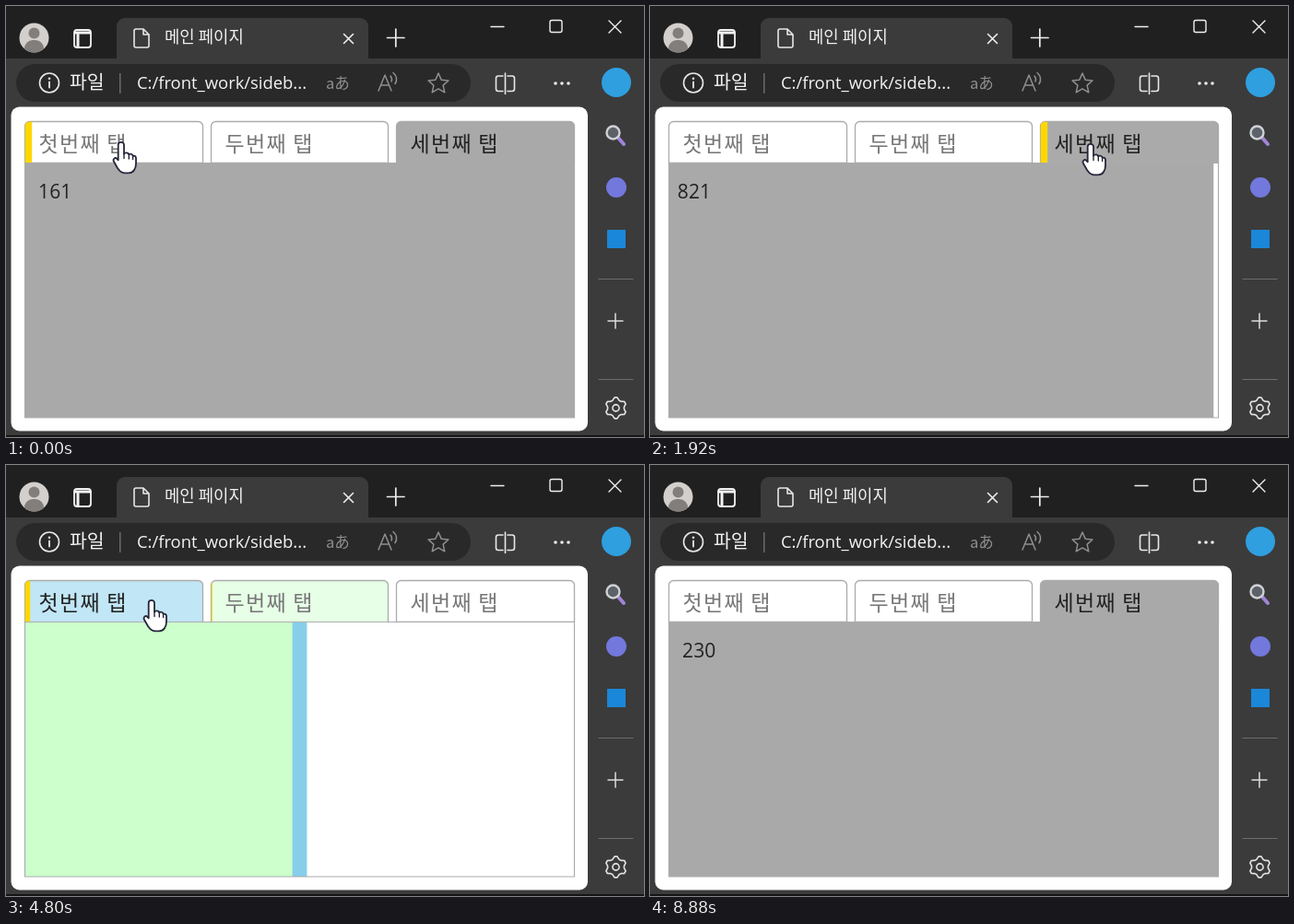
Animation of 692x468 px, one loop 8.96 s. Source, as an HTML page with a canvas:

```html
<!DOCTYPE html>
<html lang="ko">
<head>
<meta charset="utf-8">
<title>메인 페이지</title>
<style>
html, body { margin: 0; width: 100%; height: 100%; overflow: hidden; background: #3b3b3b; }
canvas { display: block; width: 692px; height: 468px; }
</style>
</head>
<body>
<canvas id="stage" width="692" height="468"></canvas>
<script>
const ctx = document.getElementById('stage').getContext('2d');
const LOOP = 8960, STEP = 80, DUR = 300;
const KR = '"Noto Sans CJK KR", "Noto Sans CJK", sans-serif';
const LATIN = '"Open Sans", "Noto Sans", ' + KR;
const LINE = '#ababab';

const tabs = [
  { x: 20, w: 194, label: '첫번째 탭', rgb: [135, 206, 235] },
  { x: 222, w: 193, label: '두번째 탭', rgb: [204, 255, 204] },
  { x: 423, w: 194, label: '세번째 탭', rgb: [169, 169, 169] }
];

// [time, tab]
const clicks = [[279, 1], [1657, 2], [3200, 0], [3980, 1], [4710, 0],
  [5250, 1], [5600, 0], [6320, 0], [8066, 2]];

// [time, x, y] of the pointer tip
const path = [
  [0, 125, 149], [90, 135, 150], [250, 262, 152], [1100, 290, 152],
  [1200, 350, 151], [1285, 423, 150], [1360, 470, 150], [1500, 478, 151],
  [2640, 478, 151], [2900, 455, 150], [2988, 415, 149], [3040, 327, 149],
  [3150, 140, 149], [3620, 140, 149], [3900, 262, 150], [4400, 262, 150],
  [4600, 232, 149], [4668, 214, 148], [4800, 158, 148], [5130, 158, 148],
  [5240, 262, 149], [5430, 255, 149], [5560, 160, 148], [5900, 148, 146],
  [7360, 148, 147], [7700, 440, 152], [8000, 582, 155], [8330, 586, 155],
  [8450, 592, 172], [8700, 612, 380], [8790, 700, 520]
];

const START = 1718025559164;

function ease(x) {
  if (x <= 0) return 0;
  if (x >= 1) return 1;
  let lo = 0, hi = 1, s;
  for (let i = 0; i < 24; i++) {
    s = (lo + hi) / 2;
    if (0.75 * s * (1 - s) + s ** 3 < x) lo = s; else hi = s;
  }
  return 0.3 * s * (1 - s) ** 2 + 3 * (1 - s) * s * s + s ** 3;
}

function pointer(t) {
  let i = 1;
  while (i < path.length - 1 && path[i][0] < t) i++;
  const a = path[i - 1], b = path[i];
  const k = Math.min(1, Math.max(0, (t - a[0]) / (b[0] - a[0])));
  return { x: a[1] + (b[1] - a[1]) * k, y: a[2] + (b[2] - a[2]) * k };
}

const hovered = p => tabs.findIndex(b =>
  p.x >= b.x && p.x <= b.x + b.w && p.y >= 125 && p.y <= 170);

// Value of a reversible on/off transition; events are [time, 0|1]
function level(events, t) {
  let from = events[0][1], to = from, t0 = -DUR;
  const at = u => from === to ? to
    : from + (to - from) * ease((u - t0) / (DUR * Math.abs(to - from)));
  for (const [time, on] of events) {
    if (time > t) break;
    if (on === to) continue;
    from = at(time);
    to = on;
    t0 = time;
  }
  return at(t);
}

tabs.forEach((tab, i) => {
  tab.active = [[-1, +(i === 2)], ...clicks.map(([t, n]) => [t, +(n === i)])];
  tab.hover = [[-1, +(i === 0)]];
  for (let t = 0; t < LOOP; t += 4) tab.hover.push([t, +(hovered(pointer(t)) === i)]);
});

function lastClick(t, tab) {
  let found;
  for (const c of clicks) if (c[0] <= t && (tab === undefined || c[1] === tab)) found = c;
  return found;
}

function text(str, x, y, font, color, spacing = 0, words = 0) {
  ctx.font = font;
  ctx.fillStyle = color;
  ctx.letterSpacing = spacing + 'px';
  ctx.wordSpacing = words + 'px';
  ctx.fillText(str, x, y);
}

function box(x, y, w, h, r, fill) {
  ctx.beginPath();
  ctx.roundRect(x, y, w, h, r);
  ctx.fillStyle = fill;
  ctx.fill();
}

function disc(x, y, r, fill) {
  ctx.beginPath();
  ctx.arc(x, y, r, 0, 7);
  ctx.fillStyle = fill;
  ctx.fill();
}

function stroke(d, color = '#e8e8e8', width = 1.5) {
  ctx.strokeStyle = color;
  ctx.lineWidth = width;
  ctx.lineJoin = ctx.lineCap = 'round';
  ctx.stroke(new Path2D(d));
}

const ring = (x, y, r) => `M${x - r} ${y}a${r} ${r} 0 1 0 ${2 * r} 0a${r} ${r} 0 1 0 ${-2 * r} 0`;

function polar(x, y, n, radius, turn) {
  let d = '';
  for (let i = 0; i < n; i++) {
    const a = turn + i * 2 * Math.PI / n, r = radius(i);
    d += (i ? 'L' : 'M') + (x + r * Math.cos(a)) + ' ' + (y + r * Math.sin(a));
  }
  return d + 'Z';
}

function drawTitleBar() {
  box(0, 0, 692, 58, 0, '#202020');
  box(0, 57, 692, 411, 0, '#3b3b3b');
  box(0, 466, 692, 2, 0, '#151515');
  box(120, 13, 273, 46, [9, 9, 0, 0], '#3b3b3b');

  ctx.save();
  disc(30.5, 34.5, 16, '#d2cfcc');
  ctx.clip();
  disc(30.5, 29.5, 6, '#827e7b');
  box(20, 37, 21, 20, 9, '#827e7b');
  ctx.restore();

  stroke('M77 26H89Q92 26 92 29V42Q92 45 89 45H77Q74 45 74 42V29Q74 26 77 26Z', '#f2f2f2', 1.8);
  stroke('M75 29H91M78 31V44', '#f2f2f2', 3);
  stroke('M141 25H149L155 31V43Q155 45 153 45H141Q139 45 139 43V27Q139 25 141 25ZM149 25V31H155', '#e8e8e8', 1.6);
  text('메인 페이지', 172, 40, `500 17.8px ${KR}`, '#f2f2f2');
  stroke('M366.5 30.5L376.5 40.5M376.5 30.5L366.5 40.5', '#eee', 1.6);
  stroke('M413.5 34.5H432M422.8 25V44', '#eee', 1.7);
  stroke('M526 22.5H540M592 15.5H601Q603 15.5 603 17.5V26.5Q603 28.5 601 28.5H592Q590 28.5 590 26.5V17.5Q590 15.5 592 15.5Z', '#f0f0f0', 1.4);
  stroke('M654 16L667 29M667 16L654 29', '#f0f0f0', 1.4);
}

function drawToolbar() {
  box(11, 63, 493, 41, 20.5, '#292929');
  stroke(ring(47, 83.5, 10.5), '#e8e8e8', 1.6);
  stroke('M47 82.5V88.5', '#e8e8e8', 1.8);
  disc(47, 78.7, 1.3, '#e8e8e8');
  text('파일', 69, 90, `500 20.5px ${KR}`, '#f2f2f2');
  box(123, 73, 1.5, 22, 0, '#6b6b6b');
  text('C:/front_work/sideb...', 142, 90, `18.4px ${LATIN}`, '#f4f4f4');
  text('aあ', 347, 90, `16.5px ${KR}`, '#8f8f8f');
  stroke('M404 92L411 75L418 92M406.5 86H415.5M417 76Q419.5 79 418 82M420 72.5Q426 78 422 84.5', '#8f8f8f', 1.5);
  stroke(polar(469, 84.5, 10, i => i % 2 ? 5.4 : 11.5, -Math.PI / 2), '#8f8f8f', 1.5);
  stroke('M539 76H534Q531.5 76 531.5 78.5V90Q531.5 92.5 534 92.5H539M544 76H549Q551.5 76 551.5 78.5V90Q551.5 92.5 549 92.5H544M541.5 73V95.5', '#e8e8e8', 1.6);
  for (const x of [596, 603, 610]) disc(x, 84, 1.8, '#eee');
}

function drawSidebar() {
  disc(662, 83, 16, '#2f9fe0');
  stroke('M664 143L670 150', '#a184d6', 4);
  disc(658.5, 137.5, 7, '#5d6268');
  stroke(ring(658.5, 137.5, 7), '#cfd2d6', 2.4);
  disc(662, 197, 11, '#7278dc');
  box(652, 243, 20, 20, 0, '#1b87d8');
  stroke('M643 296.5H680M643 405.5H680', '#6d6d6d', 1.2);
  stroke('M653 342H669M661 334V350', '#dedede', 1.5);
  const r = i => [9, 11.5, 11.5, 9][i % 4];
  stroke(polar(661.5, 436.5, 24, r, Math.PI / 24), '#e4e4e4', 1.6);
  stroke(ring(661.5, 436.5, 3.6), '#e4e4e4', 1.6);
}

function drawPanel(i, p, t) {
  if (p <= 0) return;
  const off = (p - 1) * 596, x = 35 + off;
  box(20 + off, 170, 596.5, 277, 0, `rgb(${tabs[i].rgb})`);
  const hit = lastClick(t, i), ink = '#222';
  const stamp = START + (hit ? hit[0] : 0);
  const font = `21px ${LATIN}`;
  if (i === 0) {
    const sec = Math.floor(stamp / 1000) % 60;
    text(`Mon Jun 10 2024 22:19:${sec} GMT+0900`, x, 208.5, font, ink, 0.14, 3.4);
    text('(한국 표준시)', x + 395, 208.5, `22.5px ${KR}`, ink, 1);
  } else {
    text(i === 1 ? String(stamp) : hit ? String(stamp % 1000) : '161', x, 208.5, font, ink, 0.14);
  }
}

function drawTab(tab, on, p, bar, selected) {
  const { x, w } = tab;
  const rgb = tab.rgb.map(c => Math.round(255 + (c - 255) * p));
  const shape = new Path2D();
  shape.roundRect(x + 0.5, 125.5, w - 1, 45.5, [5, 5, 0, 0]);
  ctx.save();
  ctx.beginPath();
  ctx.rect(x - 1, 124, w + 2, 47);
  ctx.clip();
  ctx.fillStyle = `rgb(${rgb})`;
  ctx.fill(shape);
  ctx.strokeStyle = LINE;
  ctx.lineWidth = 1.3;
  ctx.stroke(shape);
  ctx.globalAlpha = 1 - p;
  ctx.fillStyle = LINE;
  ctx.fillRect(x, 169.7, w, 1.3);
  ctx.globalAlpha = 1;
  ctx.clip(shape);
  ctx.fillStyle = '#ffd700';
  ctx.fillRect(x + 0.5, 125.5, bar * 7.7, 44.5);
  ctx.restore();

  const font = `23px ${KR}`;
  text(tab.label, x + 15.5, 157.5, font, on ? '#222' : '#777', 1.3);
  if (selected) {
    const head = ctx.measureText('첫번째 ').width;
    box(x + 15.5 + head - 1, 134, 23, 29, 0, '#2160cf');
    text('탭', x + 15.5 + head, 157.5, font, '#fff', 1.3);
  }
}

const hand = 'M-3.3 2C-3.3-2.2 3-2.2 3 2V11.5C4.2 9.8 7.8 10 8.3 12.3C9.6 11 12.3 11.6 12.6 13.8C14.5 13 16 14.2 16 16.5V22C16 28 13 32.3 8 32.3H3.5C0 32.3-2 30-4 27L-8 20C-9.6 17-6.5 15-4.6 16.8L-3.3 18.3Z';
const arrow = 'M0 0V22L5 17.5L9 26.5L13 24.5L9.2 16H16Z';

function drawPointer(p, isHand) {
  ctx.save();
  ctx.translate(p.x, p.y);
  const d = isHand ? hand : arrow;
  ctx.fillStyle = '#fff';
  ctx.fill(new Path2D(d));
  stroke(d, '#26263a', 1.8);
  if (isHand) stroke('M3 11.5V16.5M8.3 12.5V17M12.6 14V17.5', '#26263a', 1.4);
  ctx.restore();
}

function draw(t) {
  drawTitleBar();
  drawToolbar();
  drawSidebar();
  box(5.5, 109.5, 625.5, 352, 9, '#fff');

  const levels = tabs.map(tab => level(tab.active, t));
  const hit = lastClick(t);
  const current = hit ? hit[1] : 2;
  const selected = t >= 6160 && t < 6720;

  ctx.save();
  ctx.beginPath();
  ctx.rect(20, 170, 597, 277);
  ctx.clip();
  levels.forEach((p, i) => drawPanel(i, p, t));
  ctx.restore();
  ctx.strokeStyle = LINE;
  ctx.lineWidth = 1.2;
  ctx.strokeRect(20.5, 170.5, 596, 276.5);

  tabs.forEach((tab, i) =>
    drawTab(tab, i === current, levels[i], level(tab.hover, t), selected && i === 0));
  const p = pointer(t);
  drawPointer(p, hovered(p) >= 0 && !selected);
}

const begin = performance.now();
let shown = -1;
function tick() {
  const t = Math.floor((performance.now() - begin) % LOOP / STEP) * STEP;
  if (t !== shown) draw(shown = t);
  requestAnimationFrame(tick);
}
tick();
</script>
</body>
</html>
```
